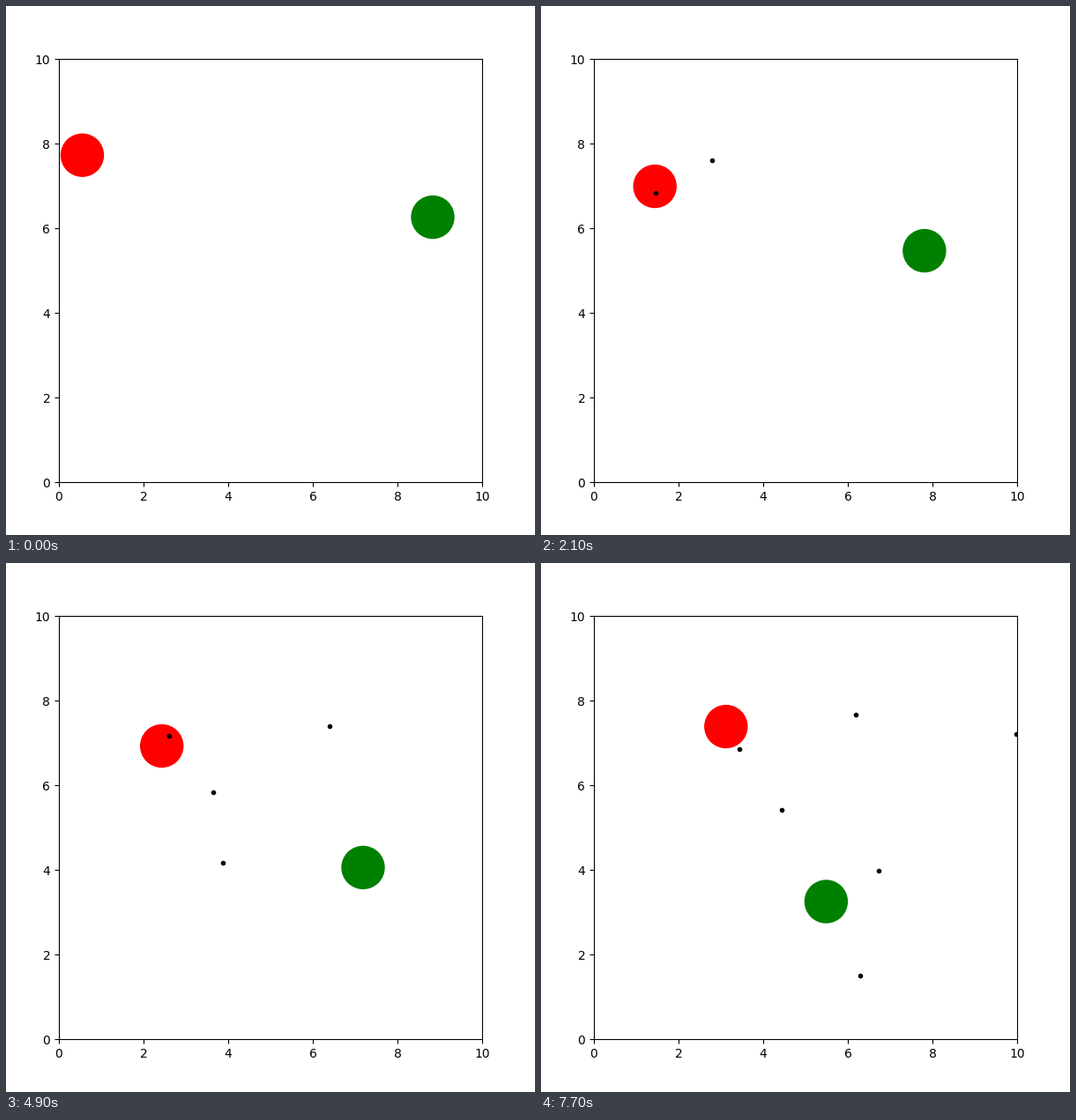
These frames come from a looping animation (600x600 px, 8000 ms). A matplotlib script:

```python
import numpy as np
import matplotlib.pyplot as plt
from matplotlib.animation import FuncAnimation
from matplotlib.patches import Circle

INTERVAL, FRAMES = 50, 160   # one 8 s loop
HOLD, LAST = 7, 22           # ticks per step, final step
RELOAD, SPEED = 4, 0.45      # steps between shots, units per step

# turning points: step, x, y in stage pixels
SHOOTER = [(0, 86.5, 169.2), (4, 115, 196.2), (6, 129.2, 204.5), (8, 142.1, 203.9),
           (10, 153.4, 200.1), (12, 164.1, 199.1), (14, 176.7, 207.5),
           (17, 198.2, 210.2), (20, 217.3, 191.2), (22, 209.8, 185.5)]
RUNNER = [(1, 484, 239.5), (5, 444.8, 281.8), (6, 434.9, 277.6), (8, 416.8, 279.8),
          (10, 406.5, 298.4), (13, 415.8, 333.8), (14, 405, 345.4),
          (17, 378.6, 379.3), (18, 367.6, 386), (22, 323.4, 384)]
AIMS = [-0.0548, -0.832, -0.541, 0.142, -0.713, -1.21]   # shot headings


def locate(path, step):
    """Place on a path of straight legs, in axes units."""
    t, x, y = np.transpose(path)
    return np.array([np.interp(step, t, x) - 60, 540 - np.interp(step, t, y)]) / 48


def bullet(n, step):
    """A shot shows one step after firing, at the place it was fired from."""
    fired = n * RELOAD
    way = np.array([np.cos(AIMS[n]), np.sin(AIMS[n])])
    return locate(SHOOTER, fired) + (step - fired - 1) * SPEED * way


fig = plt.figure(figsize=(6, 6), dpi=100)
ax = fig.add_axes([0.1, 0.1, 0.8, 0.8], xlim=(0, 10), ylim=(0, 10))
red = ax.add_patch(Circle((0, 0), 0.5, color="red"))
green = ax.add_patch(Circle((0, 0), 0.5, color="green"))
dots, = ax.plot([], [], "ko", markersize=3)


def update(i):
    step = min(i // HOLD, LAST)
    red.center = locate(SHOOTER, step)
    green.center = locate(RUNNER, step)
    count = -(-step // RELOAD)
    shots = [bullet(n, step) for n in range(count)]
    dots.set_data(np.reshape(shots, (-1, 2)).T)
    return red, green, dots


anim = FuncAnimation(fig, update, frames=FRAMES, interval=INTERVAL,
                     repeat=True, repeat_delay=0)
plt.show()
```
